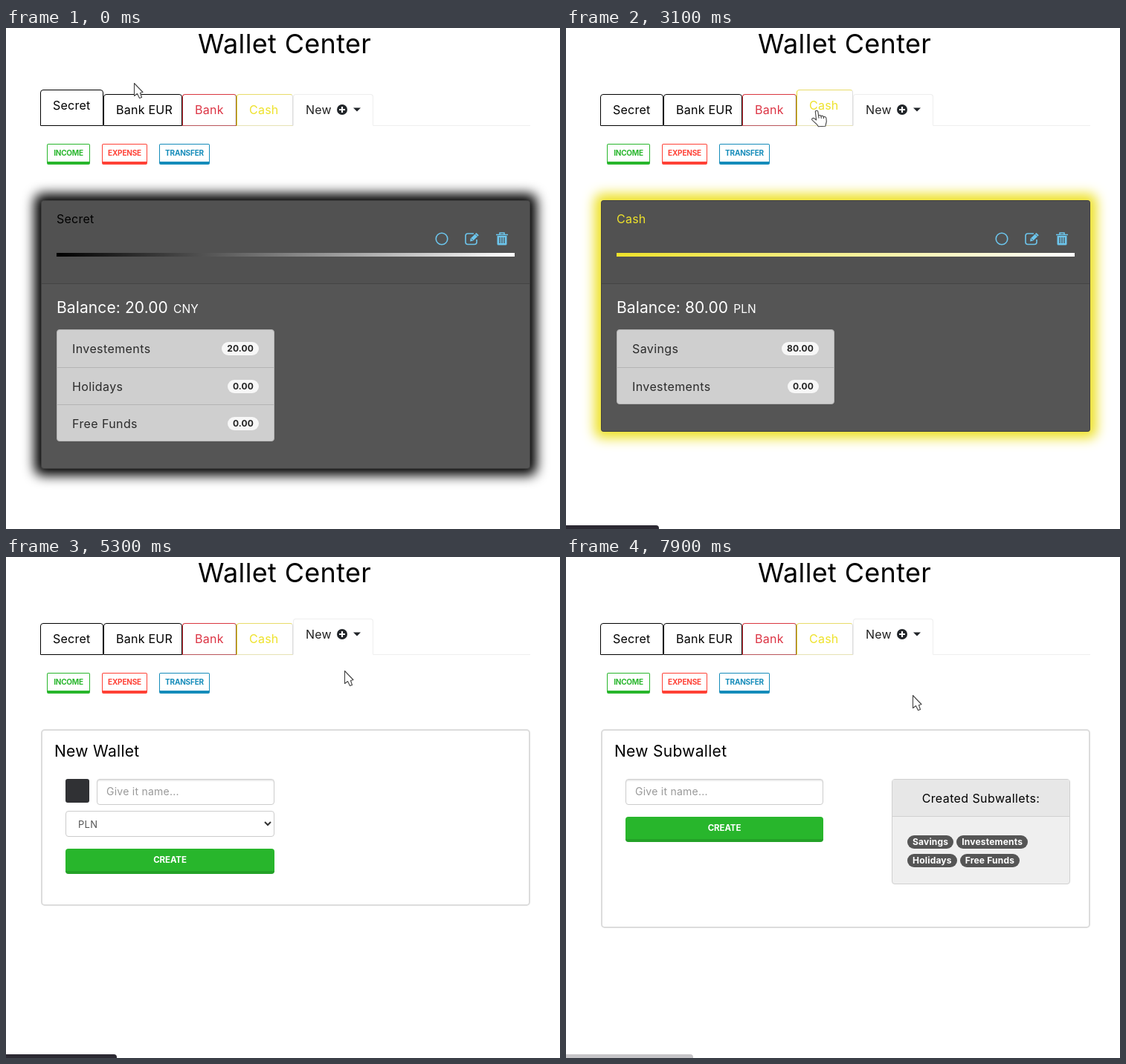
An HTML page for the animation above (8000 ms loop, 745 px wide and 675 px high).

```html
<!DOCTYPE html>
<html lang="en">
<head>
<meta charset="utf-8">
<title>Wallet Center</title>
<style>
* { box-sizing: border-box; }
html, body { margin: 0; width: 100%; height: 100%; overflow: hidden; background: #fff; }
body { position: relative; font: 16px/24px Inter, "Open Sans", sans-serif; letter-spacing: .25px; color: #000; }
body *, body > svg { position: absolute; white-space: nowrap; }
svg *, sub, .chips span, .badge { position: static; }
svg { overflow: visible; }

h1 { left: 258px; top: 0; margin: 0; font-size: 36px; line-height: 42px; font-weight: 400; letter-spacing: .35px; }

/* tabs */
.rule { left: 494px; top: 131px; width: 211px; height: 1px; background: #eee; }
.tab { bottom: 0; height: 43px; padding-left: 16px; line-height: 40px; background: #fff;
  border: 1px solid; border-radius: 4px 4px 0 0; }
.tabs { left: 0; top: 0; width: 745px; height: 132px; }
.tab span { position: static; }
.secret { left: 46px; width: 85px; border-color: #000; animation: secretTab 8s step-end infinite; }
.eur { left: 131px; width: 106px; border-color: #000; animation: eurTab 8s step-end infinite; }
.bank { left: 237px; width: 73px; color: #dc3545; border-color: #d9363e #8c5a2c #b9555a #d9363e; animation: bankTab 8s step-end infinite; }
.cash { left: 310px; width: 76px; color: #eee22b; border-color: #e8dc6a #ddd #e6e2b4 #eee22b; animation: cashTab 8s step-end infinite; }
.new { left: 386px; width: 108px; color: #222; border-color: #eee #eee transparent; animation: newTab 8s step-end infinite; }
.new svg { left: 58px; top: 13px; }

@keyframes secretTab { 0% { height: 49px } 8.75%, to { height: 43px } }
@keyframes eurTab {
  0% { height: 43px; border-color: #000 }
  1.25% { height: 43px; border-color: #eee }
  6.25% { height: 49px; border-color: #000 }
  21.25%, to { height: 43px; border-color: #000 }
}
@keyframes bankTab {
  16.25% { height: 43px; border-color: #eee }
  18.75% { height: 49px; border-color: #d9363e #8c5a2c #b9555a #d9363e }
  38.75% { height: 43px; border-color: #d9363e #8c5a2c #b9555a #d9363e }
}
@keyframes cashTab {
  26.25% { height: 43px; border-color: #eee }
  38.75% { height: 49px; border-color: #e8dc6a #ddd #e6e2b4 #eee22b }
  66.25% { height: 43px; border-color: #e8dc6a #ddd #e6e2b4 #eee22b }
}
@keyframes newTab { 0% { height: 43px } 65% { height: 45px } 66.25%, to { height: 49px } }

/* action buttons */
.act { top: 156px; height: 28px; border: 1px solid; border-bottom-width: 4px; border-radius: 2px;
  font-size: 10px; font-weight: 700; line-height: 23px; letter-spacing: -.2px; text-align: center; }

/* wallet panels */
.wallet { left: 47px; top: 232px; width: 658px; background: #555; border-radius: 4px; color: #fff;
  box-shadow: inset 0 0 0 1px rgba(0,0,0,.25), 0 0 16px 9px var(--c); }
.head { left: 1px; top: 1px; width: 656px; height: 112px; background: #515151; border-bottom: 1px solid #444; border-radius: 4px 4px 0 0; }
.name { left: 21px; top: 13px; color: var(--c); }
.bar { left: 21px; top: 71px; width: 616px; height: 5px; background: linear-gradient(90deg, var(--c), #fff); }
.icons { left: 530px; top: 42px; fill: none; stroke: #6cc5ec; stroke-width: 1.6; }
.sum { left: 21px; top: 133px; font-size: 21px; letter-spacing: .1px; }
.sum sub { font-size: 15.5px; vertical-align: baseline; margin-left: 1px; }
.list { left: 21px; top: 174px; width: 293px; background: #cfcfcf; border: 1px solid #b4b4b4; border-radius: 4px; color: #2b2b2b; }
.row { left: 0; width: 291px; height: 50px; padding: 0 20px; line-height: 50px; letter-spacing: .4px;
  display: flex; justify-content: space-between; align-items: center; }
.row + .row { border-top: 1px solid #b4b4b4; }
.row span { position: static; }
.badge { background: #f7f7f7; color: #222; }
.row .badge, .chips span { height: 18px; padding: 0 7px; border-radius: 9px; font-size: 12px; font-weight: 700; line-height: 18px; letter-spacing: .1px; }

.p0 { animation: p0 8s step-end infinite; }
.p1 { animation: p1 8s step-end infinite; }
.p2 { animation: p2 8s step-end infinite; }
.p3 { animation: p3 8s step-end infinite; }
.p4 { animation: p4 8s step-end infinite; }
.p5 { animation: p5 8s step-end infinite; }
@keyframes p0 { 0% { visibility: visible } 8.75%, to { visibility: hidden } }
@keyframes p1 { 0%, 20%, to { visibility: hidden } 8.75% { visibility: visible } }
@keyframes p2 { 0%, 38.75%, to { visibility: hidden } 20% { visibility: visible } }
@keyframes p3 { 0%, 66.25%, to { visibility: hidden } 38.75% { visibility: visible } }
@keyframes p4 { 0%, 96.25%, to { visibility: hidden } 66.25% { visibility: visible } }
@keyframes p5 { 0% { visibility: hidden } 96.25%, to { visibility: visible } }

/* forms */
.form { left: 47px; top: 232px; width: 658px; border: 2px solid #dcdcdc; border-radius: 5px; background: #fff; }
.form h2 { left: 16px; top: 16px; margin: 0; font-size: 21px; line-height: 24px; font-weight: 400; letter-spacing: .3px; }
.field { height: 35px; padding-left: 12px; border: 1px solid #ccc; border-radius: 4px; font-size: 14px; line-height: 32px;
  color: #999; box-shadow: inset 0 2px 0 rgba(0,0,0,.075); }
.pick { left: 31px; top: 108px; width: 281px; padding-left: 16px; color: #555; font-size: 13px; line-height: 34px; box-shadow: none; }
.pick svg { left: 266px; top: 13px; fill: none; stroke: #333; stroke-width: 2; }
.swatch { left: 31px; top: 65px; width: 32px; height: 32px; border-radius: 3px; background: #303134; }
.create { left: 31px; height: 34px; border-radius: 4px; background: #28b62c; border-bottom: 4px solid #23a127; color: #fff;
  font-size: 11.5px; font-weight: 700; line-height: 30px; letter-spacing: -.1px; text-align: center; }
.card { left: 389px; top: 65px; width: 240px; height: 142px; border: 1px solid #d0d0d0; border-radius: 4px; background: #efefef; }
.card b { left: 0; top: 0; width: 238px; height: 50px; border-bottom: 1px solid #d0d0d0; background: #e7e7e7;
  font-weight: 400; line-height: 50px; letter-spacing: .4px; text-align: center; }
.chips { left: 20px; display: flex; gap: 4px; }
.chips span { background: #555; color: #fff; letter-spacing: .2px; }

/* dropdown */
.menu { left: 386px; top: 131px; width: 160px; height: 79px; background: #fff; border: 1px solid #ddd; border-bottom: 4px solid #d8d8d4;
  border-radius: 0 0 4px 4px; font-size: 14px; line-height: 29px; letter-spacing: .4px; animation: menu 8s step-end infinite; }
.menu div { left: 0; width: 158px; height: 29px; padding-left: 24px; color: #808080; }
.menu .w { top: 8px; animation: pickW 8s step-end infinite; }
.menu .s { top: 37px; animation: pickS 8s step-end infinite; }
@keyframes menu { 0%, 66.25%, 96.25%, to { visibility: hidden } 52.5%, 82.5% { visibility: visible } }
@keyframes pickW { 63.75%, to { background: #158cba; color: #fff } }
@keyframes pickS { 93.75%, to { background: #158cba; color: #fff } }

/* link hint at the bottom edge */
.hint { left: 0; top: 670px; height: 5px; border-radius: 0 4px 0 0; background: #2c2a33; animation: hint 8s step-end infinite; }
@keyframes hint {
  0% { width: 125px; opacity: 0 }
  8.75% { width: 125px; opacity: .5 }
  10% { width: 125px; opacity: 1 }
  50% { width: 83px; opacity: 1 }
  58.75% { width: 149px; opacity: 1 }
  71.25% { width: 149px; opacity: .4 }
  72.5% { width: 83px; opacity: 0 }
  78.75% { width: 83px; opacity: .85 }
  80% { width: 83px; opacity: 1 }
  88.75% { width: 171px; opacity: 1 }
  97.5% { width: 171px; opacity: .6 }
  98.75%, to { width: 171px; opacity: .27 }
}

/* pointer */
.pointer { left: 0; top: 0; width: 1px; height: 1px; fill: #fff; stroke: #444; stroke-width: 1.1; stroke-linejoin: round; animation: move 8s infinite steps(1); }
.arrow { animation: arrow 8s step-end infinite; }
.hand { animation: hand 8s step-end infinite; }
@keyframes arrow { 0%, 65%, 95%, to { visibility: visible } 1.25%, 75%  { visibility: hidden } }
@keyframes hand { 0%, 65%, 95%, to { visibility: hidden } 1.25%, 75% { visibility: visible } }
@keyframes move {
  0% { transform: translate(172px, 74px); animation-timing-function: steps(2) }
  2.5% { transform: translate(179px, 115px) }
  6.25% { transform: translate(180px, 117px) }
  11.25% { transform: translate(180px, 117px); animation-timing-function: steps(5) }
  17.5% { transform: translate(271px, 111px) }
  23.75% { transform: translate(271px, 111px); animation-timing-function: steps(3) }
  27.5% { transform: translate(328px, 113px) }
  28.75% { transform: translate(328px, 113px); animation-timing-function: steps(2) }
  31.25% { transform: translate(337px, 111px) }
  42.5% { transform: translate(337px, 111px); animation-timing-function: steps(5) }
  48.75% { transform: translate(460px, 111px) }
  53.75% { transform: translate(460px, 111px); animation-timing-function: steps(5) }
  60% { transform: translate(455px, 153px) }
  73.75% { transform: translate(455px, 153px); animation-timing-function: steps(2) }
  76.25% { transform: translate(473px, 122px) }
  78.75% { transform: translate(470px, 110px) }
  83.75% { transform: translate(470px, 110px); animation-timing-function: steps(5) }
  90%, to { transform: translate(466px, 186px) }
}
</style>
</head>
<body>
<h1>Wallet Center</h1>
<div class="rule"></div>
<div class="tabs">
  <div class="tab secret">Secret</div>
  <div class="tab eur">Bank EUR</div>
  <div class="tab bank">Bank</div>
  <div class="tab cash">Cash</div>
  <div class="tab new">New
    <svg width="34" height="14"><circle cx="7" cy="7" r="7" fill="#212529"/><path d="M7 3v8M3 7h8" stroke="#fff" stroke-width="2.2"/><path d="M22 4.5h10l-5 5z" fill="#212529"/></svg>
  </div>
</div>
<div class="act" style="left:55px;width:58px;color:#28b62c">INCOME</div>
<div class="act" style="left:129px;width:61px;color:#ff4136">EXPENSE</div>
<div class="act" style="left:206px;width:68px;color:#158cba">TRANSFER</div>

<div id="wallets" style="left:0;top:0"></div>

<div class="form p4" style="height:238px">
  <h2>New Wallet</h2>
  <div class="swatch"></div>
  <div class="field" style="left:73px;top:65px;width:239px">Give it name...</div>
  <div class="field pick">PLN<svg width="10" height="6"><path d="M1 1l4 4 4-4"/></svg></div>
  <div class="create" style="top:159px;width:281px">CREATE</div>
</div>
<div class="form p5" style="height:268px">
  <h2>New Subwallet</h2>
  <div class="field" style="left:31px;top:65px;width:266px">Give it name...</div>
  <div class="create" style="top:116px;width:266px">CREATE</div>
  <div class="card">
    <b>Created Subwallets:</b>
    <div class="chips" style="top:75px"><span>Savings</span><span>Investements</span></div>
    <div class="chips" style="top:100px"><span>Holidays</span><span>Free Funds</span></div>
  </div>
</div>

<div class="menu"><div class="w">Wallet</div><div class="s">Subwallet</div></div>
<div class="hint"></div>
<svg class="pointer">
  <path class="arrow" d="M.5 .5V17.5L4.5 14.5 7.5 20.5 10.5 19.5 8.5 13.5 12 12.5Z"/>
  <g class="hand">
    <path d="M-1.7 1.7C-1.7 -.3 1.7 -.3 1.9 1.7L2.6 7.2C3.5 6 5.6 6.3 5.9 7.8 7 6.8 9 7.3 9.3 8.8 10.8 8 12.8 8.8 12.9 10.5L13.3 15 11.8 21.3 2.4 21.8C1 18.5-3.3 16-6 13-7.2 11-4.6 9.6-3 10.9L-.4 13Z"/>
    <path fill="none" d="M2.6 7.2l.5 3.5M5.9 7.8l.5 3M9.3 8.8l.3 2.5"/>
  </g>
</svg>

<script>
const wallets = [
  ["Secret", "#000", "20.00", "CNY", { Investements: "20.00", Holidays: "0.00", "Free Funds": "0.00" }],
  ["Bank EUR", "#000", "45.25", "EUR", { Investements: "45.25", Holidays: "0.00", "Free Funds": "0.00" }],
  ["Bank", "#dc3b3e", "567.50", "PLN", { Savings: "17.50", Investements: "535.00", Holidays: "0.00", "Free Funds": "15.00" }],
  ["Cash", "#eee22b", "80.00", "PLN", { Savings: "80.00", Investements: "0.00" }]
];
const icons = `<svg class="icons" width="100" height="20">
  <circle cx="9" cy="10" r="7.8"/>
  <path d="M52 3H44Q41 3 41 6V14.500Q41 17.500 44 17.500H53Q56 17.500 56 14.500V11"/>
  <path d="M47 13.500l.7-4L55.500 2l3.300 3.300-7.800 7.500z" fill="#6cc5ec" stroke="none"/>
  <path d="M48.500 9.500l2.500 2.500M53.800 3.500l3.500 3.500" stroke="#515151" stroke-width=".8"/>
  <path d="M82 4.500h16M87 4V2h6v2"/>
  <path d="M83.500 6h13v11q0 1.500-1.500 1.500h-10q-1.500 0-1.500-1.500z" fill="#6cc5ec" stroke="none"/>
  <path d="M87 8v8M90 8v8M93 8v8" stroke="#515151" stroke-width="1.300"/></svg>`;

const row = ([name, value], i) =>
  `<div class="row" style="top:${i * 50}px"><span>${name}</span><span class="badge">${value}</span></div>`;

document.getElementById("wallets").innerHTML = wallets.map(([name, color, sum, unit, parts], i) => {
  const rows = Object.entries(parts);
  return `<div class="wallet p${i}" style="--c:${color};height:${212 + rows.length * 50}px">
    <div class="head"></div><div class="name">${name}</div>${icons}<div class="bar"></div>
    <div class="sum">Balance: ${sum} <sub>${unit}</sub></div>
    <div class="list" style="height:${rows.length * 50 + 1}px">${rows.map(row).join("")}</div></div>`;
}).join("");
</script>
</body>
</html>
```
